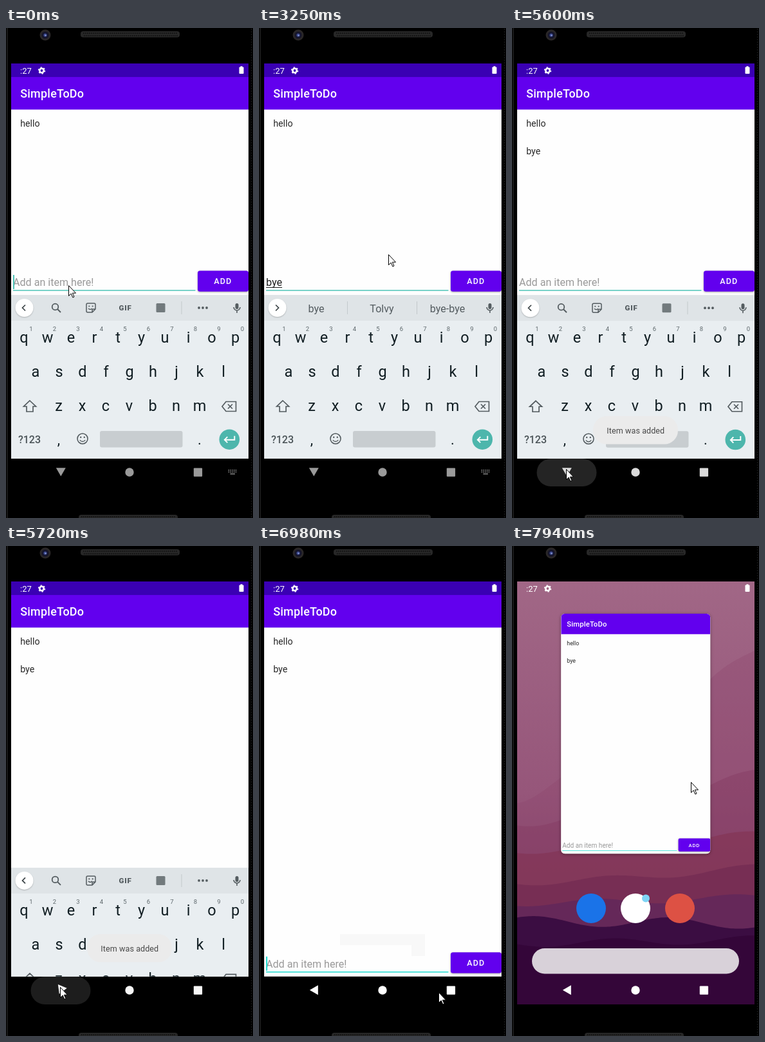
Write an HTML page with a canvas that moves like this. It is 384 px wide and 760 px high and loops after 8000 ms.

```html
<!DOCTYPE html>
<html lang="en">
<head>
<meta charset="utf-8">
<title>To-do list demo</title>
<style>
html, body { margin: 0; width: 100%; height: 100%; overflow: hidden; background: #000; }
canvas { display: block; width: 384px; height: 760px; }
</style>
</head>
<body>
<canvas id="stage"></canvas>
<script>
const W = 384, H = 760, LOOP = 8000;
const canvas = document.getElementById('stage');
const ctx = canvas.getContext('2d');
const dpr = window.devicePixelRatio || 1;
canvas.width = W * dpr;
canvas.height = H * dpr;

const PURPLE = '#6200ee', ICON = '#545c60', INK = '#101d22';
const TYPE = 2220, KEY_GAP = 250, SUBMIT = 3920, BLINK = 510, FOLD = 5595, OVERVIEW = 7790;
const WORDS = { b: ['b', 'be', 'but'], by: ['by', 'bye', 'buy'], bye: ['bye', 'Tolvy', 'bye-bye'] };

// Turning points of the pointer: time, x, y.
const REST = [97, 399];
const ROUTE = [
  [3250, 201, 351], [3640, 343, 382], [4290, 343, 382], [4423, 325, 349], [4684, 200, 276],
  [4944, 67, 687], [5595, 84, 684], [6630, 84, 682], [7030, 303, 693], [7540, 303, 693],
  [7680, 308, 666], [7810, 308, 677], [7940, 278, 366]
];

let t = 0, beat = 0;
const toBeat = ms => 3250 + Math.floor((ms - 3205) / 130.3) * 130.3;

const clamp = (v, lo, hi) => Math.min(hi, Math.max(lo, v));
const lerp = (a, b, k) => a + (b - a) * k;
const ramp = (from, to) => clamp((beat - from) / (to - from), 0, 1);
const easeOut = k => 1 - (1 - k) ** 2;

function pointerAt() {
  if (beat < ROUTE[0][0]) return REST;
  const i = ROUTE.findIndex(p => p[0] > beat);
  if (i < 0) return ROUTE.at(-1).slice(1);
  const [t0, x0, y0] = ROUTE[i - 1], [t1, x1, y1] = ROUTE[i];
  const k = easeOut(ramp(t0, t1));
  return [lerp(x0, x1, k), lerp(y0, y1, k)];
}

const keysHit = () => clamp(Math.floor((t - TYPE) / KEY_GAP) + 1, 0, 3);
const typed = () => t < SUBMIT ? 'bye'.slice(0, keysHit()) : '';

function caretOn() {
  let edit = -260;
  if (t >= TYPE) edit = TYPE + (keysHit() - 1) * KEY_GAP;
  if (t >= SUBMIT) edit = SUBMIT;
  return t < OVERVIEW && Math.floor((t - edit) / BLINK) % 2 === 0;
}

function rect(x, y, w, h, color, r = 0) {
  ctx.fillStyle = color;
  ctx.beginPath();
  ctx.roundRect(x, y, w, h, r);
  ctx.fill();
}

function disc(x, y, r, color) {
  ctx.fillStyle = color;
  ctx.beginPath();
  ctx.arc(x, y, r, 0, Math.PI * 2);
  ctx.fill();
}

function ring(x, y, r, color, width) {
  ctx.strokeStyle = color;
  ctx.lineWidth = width;
  ctx.beginPath();
  ctx.arc(x, y, r, 0, Math.PI * 2);
  ctx.stroke();
}

function path(d, x, y, fill, stroke, width = 1.5) {
  ctx.save();
  ctx.translate(x, y);
  const p = new Path2D(d);
  if (fill) { ctx.fillStyle = fill; ctx.fill(p); }
  if (stroke) { ctx.strokeStyle = stroke; ctx.lineWidth = width; ctx.stroke(p); }
  ctx.restore();
}

function text(str, x, y, size, color, { weight = 400, align = 'left', gap = 0 } = {}) {
  ctx.font = `${weight} ${size}px Roboto, sans-serif`;
  ctx.letterSpacing = gap + 'px';
  ctx.textAlign = align;
  ctx.fillStyle = color;
  ctx.fillText(str, x, y);
  return ctx.measureText(str).width;
}

function shadowed(alpha, blur, drawShape) {
  ctx.save();
  ctx.shadowColor = `rgba(0,0,0,${alpha})`;
  ctx.shadowBlur = blur * dpr;
  ctx.shadowOffsetY = dpr;
  drawShape();
  ctx.restore();
}

function clipTo(x, y, w, h, r = 0) {
  ctx.beginPath();
  ctx.roundRect(x, y, w, h, r);
  ctx.clip();
}

function drawShell() {
  rect(0, 0, W, H, '#000');
  rect(1, 0, 2, H, '#181818');
  for (let y = 1; y < H; y += 4) rect(381, y, 1, 2, '#1c1c1c');
  disc(61, 11, 8.5, '#2a2727');
  disc(61, 11, 5.5, '#15152b');
  disc(61, 11, 2.6, '#3d4c94');
  disc(61.5, 11.5, 1, '#a9b2dc');
  for (const [x, y] of [[116, 5], [113, 755]]) {
    rect(x, y, 154, 9.5, '#272727', 4);
    for (let i = 4; i < 150; i += 3) {
      rect(x + i, y + 2, 1.5, 2, '#111');
      rect(x + i + 1, y + 6, 1.5, 2, '#111');
    }
  }
}

function drawStatus() {
  text(':27', 22, 70.5, 13, '#fff');
  ring(55.5, 66, 3.2, '#fff', 2.6);
  ctx.setLineDash([2.2, 2.99]);
  ring(55.5, 66, 4.95, '#fff', 1.5);
  ctx.setLineDash([]);
  rect(362.5, 60.5, 7, 10.5, '#fff', 1);
  rect(364.5, 59.3, 3, 2, '#fff');
}

function drawInput() {
  const str = typed(), low = beat > FOLD + 1;
  const accent = low ? '#20dcd1' : '#4cc3b7';
  ctx.save();
  ctx.translate(0, low ? 253.7 : 0);
  let end = 0;
  if (str) {
    end = text(str, 11, 400, 16.1, '#202020');
    rect(11, 402, end, 1, '#202020');
  } else {
    text('Add an item here!', 11, 400, 16.1, '#999');
  }
  rect(11, 406.3, 283.5, 1.5, accent);
  if (caretOn()) rect(11 + end, 383, 2, 22, accent);
  shadowed(.35, 3, () => rect(298, 376.5, 79, 32.2, PURPLE, 3.5));
  if (t >= SUBMIT) {
    rect(298, 376.5, 79, 32.2, `rgba(255,255,255,${.25 * (1 - ramp(SUBMIT, 4290))})`, 3.5);
  }
  text('ADD', 323.3, 397.4, 12.56, '#fff', { weight: 500, gap: 1.12 });
  ctx.restore();
}

function drawApp() {
  rect(8, 76, 369, 592, '#fefefe');
  rect(8, 76, 369, 50.4, PURPLE);
  text('SimpleToDo', 22.2, 108.2, 17.94, '#fff', { weight: 500, gap: .25 });
  const items = t < SUBMIT ? ['hello'] : ['hello', 'bye'];
  items.forEach((item, i) => text(item, 22.2, 153.4 + i * 43.06, 14.2, '#282828'));
  drawInput();
}

function drawMic() {
  rect(356.5, 427, 5, 9, ICON, 2.5);
  path('M-5 -1 A5 5 0 0 0 5 -1 M0 4 V8', 359, 434, null, ICON, 1.6);
}

function drawTools() {
  ring(76.5, 432.5, 4.8, ICON, 1.8);
  path('M3 3 L8 8', 77, 433, null, ICON, 2);
  path('M-7 -5 Q-7 -7 -5 -7 H5 Q7 -7 7 -5 V2 L2 7 H-5 Q-7 7 -7 5 Z M7 2 H4 Q2 2 2 4 V7 M-4 1 Q-1 4 2 1', 132, 434, null, ICON, 1.5);
  for (const x of [129.3, 134.7]) disc(x, 431.5, 1.1, ICON);
  text('GIF', 185.5, 438, 11.5, ICON, { weight: 900, align: 'center', gap: .8 });
  rect(233.5, 427, 14, 14, '#727a7d', 1.5);
  rect(272.5, 424, 1, 20, '#c3c9cc');
  for (let i = 0; i < 3; i++) disc(300 + i * 6, 434, 1.9, ICON);
}

function drawStrip(str) {
  rect(8, 414, 369, 40, '#dfe4e7');
  shadowed(.22, 2, () => disc(28.5, 434, 14, '#fff'));
  path(str ? 'M-2 -4.5 L2.5 0 L-2 4.5' : 'M2 -4.5 L-2.5 0 L2 4.5', 28, 434, null, '#3c4447', 1.7);
  if (str) {
    WORDS[str].forEach((w, i) => text(w, 89 + i * 102, 440.5, 16.1, ICON, { align: 'center' }));
    for (const x of [137, 245]) rect(x, 424, 1, 20, '#c3c9cc');
  } else {
    drawTools();
  }
  drawMic();
}

function keyRow(chars, x, y, size = 23.5, color = INK) {
  [...chars].forEach((c, i) => text(c, x + i * 36.5, y, size, color, { align: 'center' }));
}

function drawKeyboard() {
  rect(8, 414, 369, 254, '#e9eef1');
  drawStrip(typed());
  keyRow('qwertyuiop', 28, 488);
  keyRow('asdfghjkl', 46, 541);
  keyRow('zxcvbnm', 82, 594);
  keyRow('1234567890', 39, 470, 9.5, '#5d676b');
  path('M0 -9 L9.5 0 H5 V8 H-5 V0 H-9.5 Z', 37, 587, null, ICON, 1.7);
  path('M-11 0 L-5 -7.5 H10.5 V7.5 H-5 Z M-2 -3.5 L5 3.5 M5 -3.5 L-2 3.5', 347, 587, null, ICON, 1.7);
  text('?123', 36.5, 643.5, 16, '#4b5458', { weight: 500, align: 'center' });
  keyRow(',', 82, 646, 22);
  keyRow('.', 301, 646, 22);
  ring(119, 637, 8, ICON, 1.6);
  for (const x of [116.2, 121.8]) disc(x, 634.8, 1.2, ICON);
  path('M-4.2 2 A4.8 4.8 0 0 0 4.2 2', 119, 637, null, ICON, 1.4);
  rect(146, 625, 128.5, 25.5, '#c8cdd0', 3);
  disc(347.3, 638.2, 15.8, '#4db6ac');
  path('M8 -5 V1 H-7 M-3 -3.5 L-7.5 1 L-3 5.5', 347.3, 637.7, null, '#fff', 1.9);
}

function drawToast() {
  const alpha = ramp(SUBMIT, 4290) * (1 - ramp(5893, 6637));
  if (alpha) {
    ctx.save();
    ctx.globalAlpha = alpha;
    rect(126, 602, 132, 43.5, '#ebebeb', 21);
    text('Item was added', 147.3, 629, 12.56, '#484848', { gap: .08 });
    ctx.restore();
  } else if (t > SUBMIT) {
    rect(126, 602, 132, 17, '#f8f8f8');
    rect(237, 619, 21, 17, '#f8f8f8');
  }
}

function ripple(x, size, alpha) {
  ctx.globalAlpha = alpha;
  rect(x - 46.5 * size, 668, 93 * size, 43, '#242424', 21.5);
  ctx.globalAlpha = 1;
}

function drawNav() {
  ripple(85, ramp(5200, 5595), 1 - ramp(5640, 6117));
  if (t < OVERVIEW) ripple(298, ramp(7250, 7680), 1);
  const light = lerp(154, 255, ramp(5290, 5770));
  const color = `rgb(${light},${light},${light})`;
  ctx.save();
  ctx.translate(85.3, 688.8);
  ctx.rotate(ramp(FOLD, 6117) * Math.PI / 2);
  path('M-7.5 -6.5 H7.5 L0 6.5 Z', 0, 0, color);
  ctx.restore();
  disc(192, 689, 6.7, color);
  rect(291.8, 682.5, 13.3, 13.3, color, 1);
  if (t < 5480) {
    for (let i = 0; i < 10; i++) rect(345.5 + i % 5 * 2.8, 685 + (i > 4) * 2.8, 1.6, 1.6, '#858585');
    rect(348.5, 690.8, 7.5, 1.6, '#858585');
  }
}

function ridge(y, rise, wave, color) {
  ctx.fillStyle = color;
  ctx.beginPath();
  ctx.moveTo(8, 711);
  for (let x = 8; x <= 377; x += 3) {
    const u = (x - 8) / 369;
    ctx.lineTo(x, y - rise * u ** 1.5 + wave * Math.sin(u * 11 + y));
  }
  ctx.lineTo(377, 711);
  ctx.fill();
}

function drawWallpaper() {
  const sky = ctx.createLinearGradient(0, 55, 0, 711);
  sky.addColorStop(0, '#a16786');
  sky.addColorStop(.5, '#96567a');
  sky.addColorStop(1, '#713358');
  rect(8, 55, 369, 656, sky);
  ridge(385, 225, 14, 'rgba(140,68,108,.3)');
  ridge(428, 75, 8, 'rgba(132,58,98,.45)');
  ridge(472, 25, 6, 'rgba(130,50,82,.6)');
  ridge(522, 24, 5, 'rgba(112,42,82,.65)');
  ridge(554, 10, 5, '#652859');
  ridge(582, -4, 8, '#3b0d42');
  ridge(616, 6, 6, '#340639');
}

function drawOverview() {
  ctx.save();
  clipTo(8, 55, 369, 656);
  drawWallpaper();
  drawStatus();
  disc(123, 562, 23, '#1a73e8');
  disc(192, 562, 23, '#fff');
  disc(208, 546.5, 6, '#7fd4f5');
  disc(261, 562, 23, '#dd5144');
  rect(31, 624, 322, 39.5, '#d8d1d9', 19.7);
  const k = ramp(7810, 7940);
  const w = lerp(246, 232, k), scale = w / 369;
  const x = 192.3 - w / 2, y = lerp(99, 105, k);
  shadowed(.4, 5, () => rect(x, y, w, 592 * scale, '#fff', 6));
  ctx.translate(x, y);
  ctx.scale(scale, scale);
  ctx.translate(-8, -76);
  clipTo(8, 76, 369, 592, 9);
  drawApp();
  ctx.restore();
}

function drawScreen() {
  ctx.save();
  clipTo(8, 55, 369, 612.7);
  rect(8, 55, 369, 21, '#3a00b3');
  drawStatus();
  drawApp();
  ctx.save();
  ctx.translate(0, 254 * ramp(FOLD, 5986));
  drawKeyboard();
  ctx.restore();
  drawToast();
  ctx.restore();
}

function draw(ms) {
  t = ms;
  beat = toBeat(ms);
  ctx.setTransform(dpr, 0, 0, dpr, 0, 0);
  drawShell();
  if (t < OVERVIEW) drawScreen();
  else drawOverview();
  drawNav();
  path('M.5 .5 V16.5 L4.2 13 L6.9 19 L9 18 L6.4 12.2 H11.5 Z', ...pointerAt().map(Math.round), '#fff', '#000', 1);
}

const start = performance.now();
function tick() {
  draw((performance.now() - start) % LOOP);
  requestAnimationFrame(tick);
}
tick();
</script>
</body>
</html>
```
